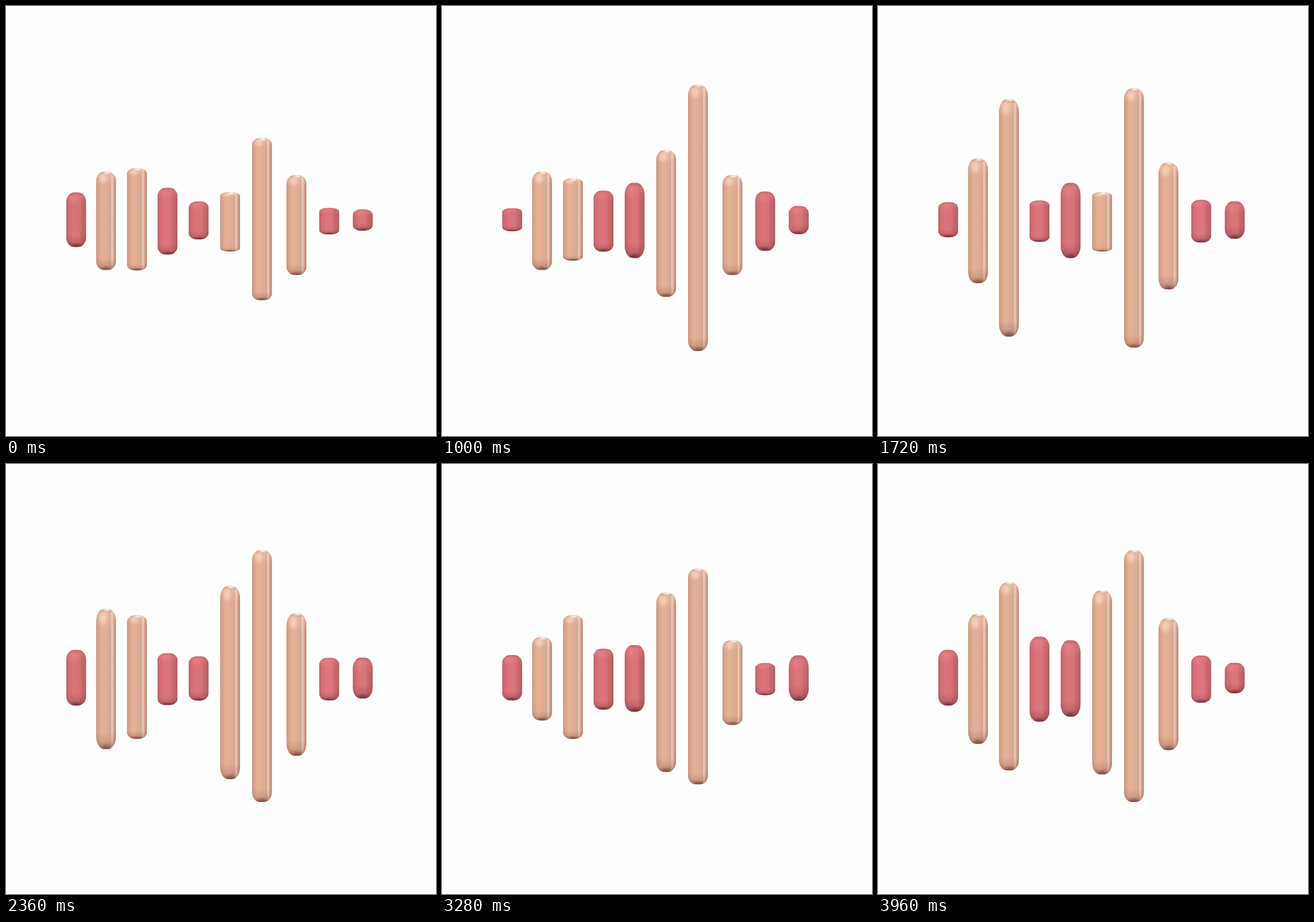
Animation, 748 px wide and 748 px high, one loop 4000 ms. Source, as an HTML page with a canvas:

```html
<!DOCTYPE html>
<html>
<head>
<meta charset="utf-8">
<style>
html, body { margin: 0; width: 100%; height: 100%; overflow: hidden; background: #fff; }
canvas { display: block; }
</style>
</head>
<body>
<canvas id="stage" width="748" height="748"></canvas>
<script>
const ctx = document.getElementById('stage').getContext('2d');
const STEP = 40, STEPS = 100, WIDTH = 34.5;

// Each wave repeats after `period` steps; keys are step, height pairs.
const wave = (period, ...flat) => {
  const keys = [];
  for (let i = 0; i < flat.length; i += 2) keys.push([flat[i], flat[i + 1]]);
  return { period, keys };
};

const tall = wave(26, 1, 171, 4, 145, 7, 244, 13, 179, 17, 217, 21, 226, 25, 171);

// x: left edge, mid: centre line, lean: centre shift per height, cap: end radius per height
const bars = [
  { x: 104.8, mid: 371.7, lean: 0, cap: .17, pink: true,
    wave: wave(20, 1, 95, 2, 79, 3, 61, 5, 40, 13, 90, 19, 97) },
  { x: 156.8, mid: 373.2, lean: .003, cap: .09, wave: tall },
  { x: 210.5, mid: 373, lean: -.011, cap: .052,
    wave: wave(23, 1, 178, 2, 143, 7, 327, 13, 215, 20, 413) },
  { x: 263.7, mid: 374.3, lean: 0, cap: .12, pink: true,
    wave: wave(26, 1, 116, 4, 106, 7, 90, 13, 107, 17, 72, 21, 148, 25, 106) },
  { x: 317.8, mid: 372.9, lean: 0, cap: .16, pink: true,
    wave: wave(18, 1, 66, 5, 77, 7, 131, 9, 133, 10, 116, 13, 71) },
  { x: 372.6, mid: 373.5, lean: .02, cap: .06,
    wave: wave(21, 1, 103, 4, 255, 7, 300, 10, 190, 13, 229, 15, 320, 17, 336, 19, 312) },
  { x: 428, mid: 374.2, lean: -.012, cap: .039,
    wave: wave(20, 1, 282, 2, 375, 3, 451, 4, 484, 5, 463, 9, 340, 13, 446, 16, 466, 19, 438) },
  { x: 488, mid: 375.2, lean: .034, cap: .085, wave: tall, scale: 1.016 },
  { x: 545, mid: 374.2, lean: 0, cap: .15, pink: true,
    wave: wave(16, 1, 46, 2, 56, 3, 82, 6, 125, 9, 103, 11, 74, 13, 90) },
  { x: 603.3, mid: 372.3, lean: 0, cap: .26, pink: true,
    wave: wave(15, 1, 37, 5, 88, 7, 79, 9, 53, 10, 49, 13, 65, 14, 71) }
];

const skins = {
  pink: {
    body: [[0, '#b95d63'], [.08, '#cd6a70'], [.35, '#db7579'], [.65, '#d87477'],
           [.76, '#c9696d'], [.92, '#bd6367'], [1, '#a4575b']],
    glow: '240,135,139', dark: '92,34,42', shine: .3
  },
  beige: {
    body: [[0, '#c4947e'], [.08, '#d6a38b'], [.3, '#e6b297'], [.62, '#dfab92'],
           [.74, '#d6a791'], [.79, '#efcfc0'], [.85, '#e3b8a3'], [.9, '#d2a08a'], [1, '#b5866f']],
    glow: '250,211,190', dark: '105,58,50', shine: .95
  }
};

function heightAt({ period, keys }, step) {
  const n = keys.length;
  const key = i => {
    const turn = Math.floor(i / n), [t, h] = keys[i - turn * n];
    return [t + turn * period, h];
  };
  const slope = i => {
    const [a, b] = [key(i - 1), key(i + 1)];
    return (b[1] - a[1]) / (b[0] - a[0]);
  };
  const t = step % period;
  let i = -1;
  while (key(i + 1)[0] <= t) i++;
  const [t0, h0] = key(i), [t1, h1] = key(i + 1);
  const d = t1 - t0, u = (t - t0) / d, v = 1 - u;
  return h0 * (1 + 2 * u) * v * v + h1 * (3 - 2 * u) * u * u +
         d * u * v * (slope(i) * v - slope(i + 1) * u);
}

function fade(gradient, stops) {
  stops.forEach(([at, color]) => gradient.addColorStop(at, color));
  return gradient;
}

function glow(x, y, rx, ry, rgb, alpha) {
  ctx.save();
  ctx.translate(x, y);
  ctx.scale(rx, ry);
  ctx.fillStyle = fade(ctx.createRadialGradient(0, 0, 0, 0, 0, 1),
    [[0, `rgba(${rgb},${alpha})`], [.4, `rgba(${rgb},${alpha * .7})`], [1, `rgba(${rgb},0)`]]);
  ctx.fillRect(-1, -1, 2, 2);
  ctx.restore();
}

function drawBar(bar, step) {
  const skin = bar.pink ? skins.pink : skins.beige;
  const h = heightAt(bar.wave, step) * (bar.scale || 1);
  const x = bar.x, top = bar.mid + bar.lean * h - h / 2, bottom = top + h;
  const cap = h * bar.cap, cx = x + WIDTH / 2;

  ctx.save();
  ctx.beginPath();
  ctx.roundRect(x, top, WIDTH, h, { x: 14, y: cap });
  ctx.fillStyle = fade(ctx.createLinearGradient(x, 0, x + WIDTH, 0), skin.body);
  ctx.fill();
  ctx.clip();

  // Rounded ends: soft light above, shadow below.
  ctx.fillStyle = fade(ctx.createLinearGradient(0, top, 0, top + cap * 1.4),
    [[0, `rgba(${skin.dark},.22)`], [.25, `rgba(${skin.glow},.3)`], [1, `rgba(${skin.glow},0)`]]);
  ctx.fillRect(x, top, WIDTH, cap * 1.4);
  ctx.fillStyle = fade(ctx.createLinearGradient(0, bottom - cap * 1.3, 0, bottom),
    [[0, `rgba(${skin.dark},0)`], [.55, `rgba(${skin.dark},.17)`], [1, `rgba(${skin.dark},.55)`]]);
  ctx.fillRect(x, bottom - cap * 1.3, WIDTH, cap * 1.3);

  glow(cx - 5, top + cap * .75, 9, cap * .7, skin.glow, bar.pink ? .4 : .85);
  glow(cx + 2, top + 1.5, 10, 3.5, bar.pink ? skin.glow : '255,250,246', skin.shine);
  glow(cx, bottom, 12, cap * .35 + 2, skin.dark, .6);
  ctx.restore();
}

function draw(now) {
  // The opening pose is held for two steps.
  const step = Math.max(1, Math.floor(now / STEP) % STEPS);
  ctx.fillStyle = '#fefefe';
  ctx.fillRect(0, 0, 748, 748);
  bars.forEach(bar => drawBar(bar, step));
}

const start = performance.now();
function tick() {
  draw(performance.now() - start);
  requestAnimationFrame(tick);
}
tick();
</script>
</body>
</html>
```
